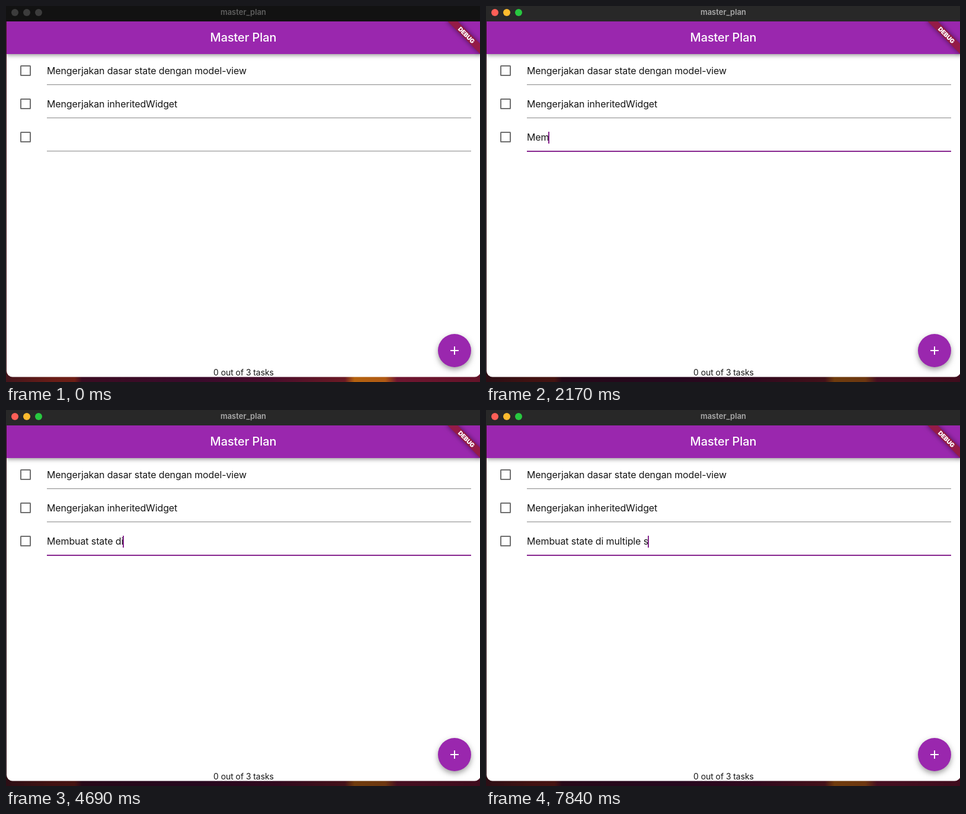
Write an HTML page with a canvas that moves like this. It is 800 px wide and 634 px high and loops after 8000 ms.

```html
<!DOCTYPE html>
<html lang="id">
<head>
<meta charset="utf-8">
<title>Master Plan</title>
<style>
html, body { margin: 0; width: 100%; height: 100%; overflow: hidden; background: #2a0d1c; }
canvas { display: block; width: 800px; height: 634px; }
</style>
</head>
<body>
<canvas id="stage" width="800" height="634"></canvas>
<script>
const ctx = document.getElementById('stage').getContext('2d');
const LOOP = 8000, STEP = 70;
const FOCUS = 980, CARET_ON = 1050, CARET_OFF = 1540;
const PURPLE = '#9a27ae', ACCENT = '#87268f';
const FONT = 'Inter, "Open Sans", sans-serif';

// Each entry: [time, characters to delete, characters to add]
const KEYS = [
  [1820, 0, 'M'], [1960, 0, 'e'], [2170, 0, 'm'],
  [2520, 0, 'b'], [2660, 0, 'u'], [2870, 0, 'a'], [3010, 0, 't'],
  [3150, 0, ' '], [3360, 0, 's'], [3570, 0, 't'], [3780, 0, 'a'],
  [3920, 0, 't'], [4130, 0, 'e'], [4270, 0, ' '], [4480, 0, 'd'],
  [4690, 0, 'i'], [4830, 0, ' '], [5110, 0, 'm'], [5320, 0, 'u'],
  [5740, 0, 'lt'], [6020, 0, 'u'], [6510, 1, ''], [6790, 0, 'i'],
  [7000, 0, 'p'], [7140, 0, 'l'], [7350, 0, 'e'], [7560, 0, ' '], [7770, 0, 's']
];

function typed(t) {
  let s = '';
  for (const [at, del, add] of KEYS) {
    if (t < at) break;
    s = s.slice(0, s.length - del) + add;
  }
  return s;
}

function rect(x, y, w, h, color) {
  ctx.fillStyle = color;
  ctx.fillRect(x, y, w, h);
}

function disc(x, y, r, color) {
  ctx.fillStyle = color;
  ctx.beginPath();
  ctx.arc(x, y, r, 0, Math.PI * 2);
  ctx.fill();
}

function shadow(color, blur, dy) {
  ctx.shadowColor = color;
  ctx.shadowBlur = blur;
  ctx.shadowOffsetY = dy;
}

function text(str, x, y, size, weight, color, spacing = 0, align = 'left') {
  ctx.font = `${weight} ${size}px ${FONT}`;
  ctx.letterSpacing = spacing + 'px';
  ctx.textAlign = align;
  ctx.fillStyle = color;
  ctx.fillText(str, x, y);
  return ctx.measureText(str).width;
}

function wallpaper(active) {
  const g = ctx.createLinearGradient(0, 0, 800, 0);
  const stops = [[0, '#45161c'], [.1, '#6a1d17'], [.145, '#6e1f16'], [.16, '#3c0c22'],
    [.4, '#3a0b2c'], [.56, '#4a0d2c'], [.715, '#6b1a24'], [.735, '#b4620f'],
    [.8, '#b05a14'], [.825, '#6f1630'], [1, '#641329']];
  for (const [p, c] of stops) g.addColorStop(p, c);
  rect(0, 0, 800, 634, g);
  if (active) rect(0, 0, 800, 634, 'rgba(8,4,10,.4)');
}

function titleBar(active) {
  rect(0, 0, 800, 26, active ? '#282828' : '#121212');
  const lights = active ? ['#fe5f57', '#febb2e', '#28c840'] : ['#3c3c3c', '#3c3c3c', '#3c3c3c'];
  lights.forEach((c, i) => disc(15 + 20 * i, 11, 6, c));
  text('master_plan', 400.5, 15, 13, 600, active ? '#a9a9a9' : '#5f5f5f', 0, 'center');
}

function appBar() {
  ctx.save();
  shadow('rgba(0,0,0,.42)', 7, 2);
  rect(1, 26, 800, 55, PURPLE);
  ctx.restore();
  text('Master Plan', 400.5, 60, 20, 500, '#fff', -.1, 'center');
}

function banner() {
  ctx.save();
  ctx.beginPath();
  ctx.rect(1, 25.5, 800, 600);
  ctx.clip();
  ctx.translate(801, 25);
  ctx.rotate(Math.PI / 4);
  ctx.save();
  shadow('rgba(0,0,0,.5)', 8, 0);
  rect(-40, 28, 80, 12, '#941b47');
  ctx.restore();
  text('DEBUG', 0, 37.7, 10.2, 900, '#fff', -.2, 'center');
  ctx.restore();
}

function row(i, str, focus, caret) {
  const y = 109 + 56 * i;
  ctx.strokeStyle = '#6f6f6f';
  ctx.lineWidth = 2;
  ctx.beginPath();
  ctx.roundRect(25, y - 8, 16, 16, .5);
  ctx.stroke();

  rect(69, y + 23, 716, 1.2, '#979797');
  if (focus > 0) {
    ctx.globalAlpha = focus;
    rect(69, y + 23, 716, 1 + focus, ACCENT);
    ctx.globalAlpha = 1;
  }
  const w = text(str, 69, y + 6, 16, 400, '#151515', -.12);
  if (caret) rect(Math.round(68 + w), y + 1 - 11 + 1, 2, 20, ACCENT);
}

function addButton() {
  ctx.save();
  shadow('rgba(0,0,0,.38)', 10, 4);
  disc(757, 581, 28, PURPLE);
  ctx.restore();
  rect(750, 580, 14, 2, '#fff');
  rect(756, 574, 2, 14, '#fff');
}

function draw(ms) {
  const t = Math.floor(ms / STEP) * STEP;
  const active = t >= FOCUS;
  const focus = Math.min(1, Math.max(0, (t - FOCUS) / 140));
  const caret = t >= CARET_ON && (t < CARET_OFF || t >= KEYS[0][0]);

  wallpaper(active);
  ctx.save();
  ctx.beginPath();
  ctx.roundRect(1, -20, 800, 645.5, 10);
  ctx.clip();
  rect(0, 0, 802, 634, '#fff');
  row(0, 'Mengerjakan dasar state dengan model-view', 0, false);
  row(1, 'Mengerjakan inheritedWidget', 0, false);
  row(2, typed(t), focus, caret);
  text('0 out of 3 tasks', 401, 623, 14, 400, '#151515', -.08, 'center');
  appBar();
  addButton();
  ctx.restore();
  banner();
  titleBar(active);
}

function frame() {
  draw(performance.now() % LOOP);
  requestAnimationFrame(frame);
}
frame();
</script>
</body>
</html>
```
